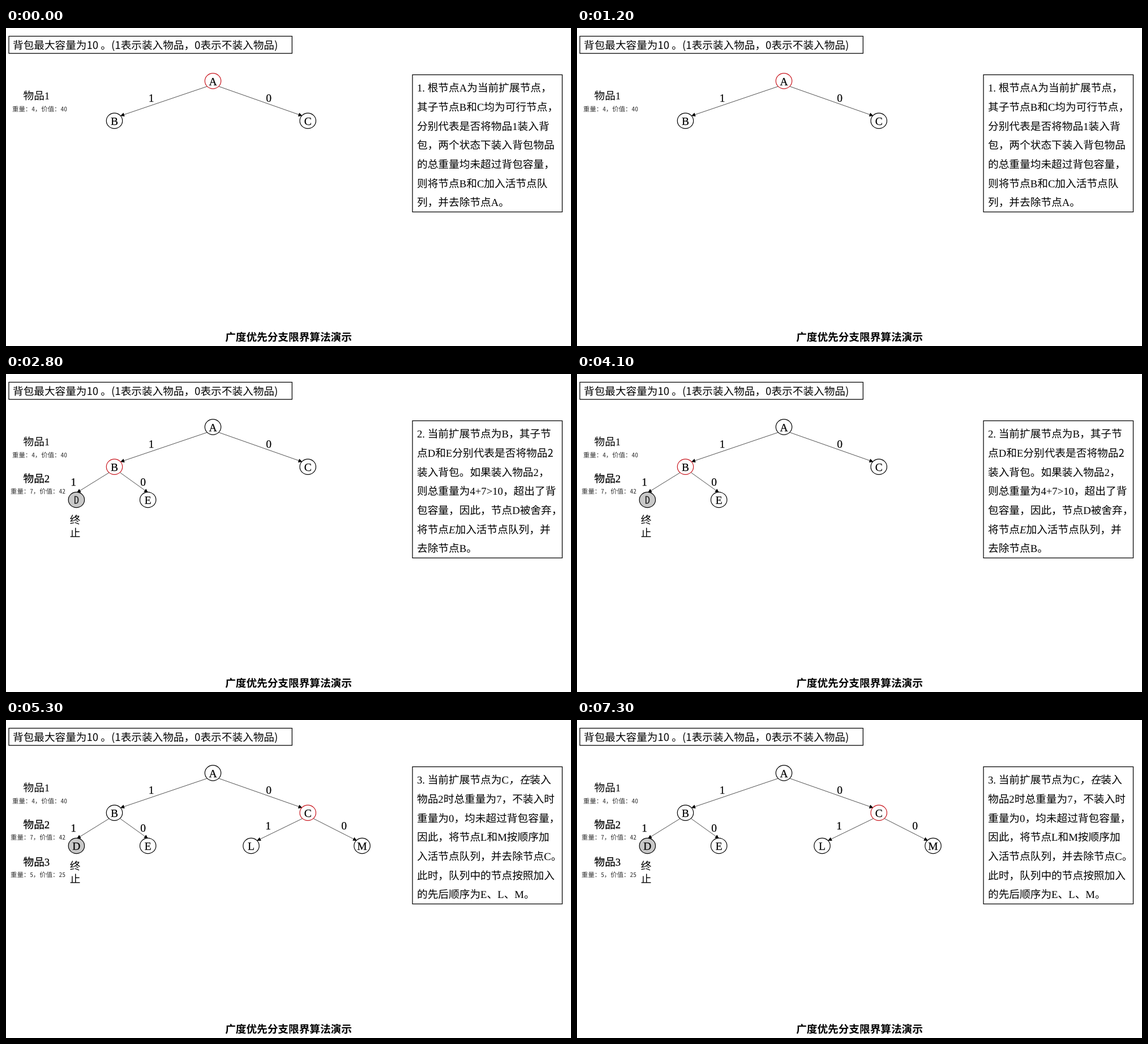
Animation of 998x561 px, one loop 8000 ms. Source, as an HTML page:

```html
<!DOCTYPE html>
<html lang="zh-CN">
<head>
<meta charset="utf-8">
<title>广度优先分支限界算法演示</title>
<style>
html, body { margin: 0; width: 100%; height: 100%; overflow: hidden; background: #fff; }
svg { display: block; width: 100%; height: 100%; text-rendering: geometricPrecision; }
text { font: 300 18.7px "Liberation Serif", "Noto Sans CJK SC", "Noto Sans CJK", serif; fill: #000; }
.sans { font-family: "Noto Sans CJK SC", "Noto Sans CJK", sans-serif; font-size: 18.65px; }
.title { font-weight: bold; }
.small { font-family: "Noto Sans Mono CJK SC", "Noto Sans CJK SC", monospace; font-size: 11.4px; fill: #333; }
.mono { font-family: "Noto Sans Mono CJK SC", "Liberation Mono", monospace; fill: #222; }
.mid { text-anchor: middle; }
.node { font-size: 19.5px; }
.heavy, .node { stroke: #000; stroke-width: .25px; }
.i { font-style: italic; }
rect { fill: none; stroke: #000; stroke-width: 1.25px; }
line { stroke: #222; stroke-width: .8px; }
ellipse { stroke-width: 1.2px; }
</style>
</head>
<body>
<svg id="stage" viewBox="0 0 998 561"></svg>
<script>
const LOOP = 8000;
const STEPS = [0, 2800, 5300];

// name, x, y, first step in which the node shows
const NODES = [
  ['A', 365.5, 93.5, 0], ['B', 191.5, 163.7, 0], ['C', 533.2, 163.7, 0],
  ['D', 124.4, 222, 1], ['E', 250.7, 222, 1],
  ['L', 433, 222, 2], ['M', 629, 222, 2]
];

// x1, y1, x2, y2, label, label x, label centre y, first step
const EDGES = [
  [355.5, 103, 202, 155, 1, 256.5, 124, 0],
  [375.7, 103, 523.5, 155, 0, 464, 124, 0],
  [182, 174, 125, 209.3, 1, 119, 190.5, 1],
  [201.7, 174, 251, 209.3, 0, 242, 190.5, 1],
  [523.3, 174, 443, 213, 1, 463, 187, 2],
  [543.3, 174, 620, 213, 0, 597, 187, 2]
];

// name, weight, value, note x, centre y
const ITEMS = [
  ['物品1', 4, 40, 11, 119],
  ['物品2', 7, 42, 8, 184],
  ['物品3', 5, 25, 8, 250]
];

const NOTES = [
  ['1. 根节点A为当前扩展节点，', '其子节点B和C均为可行节点，', '分别代表是否将物品1装入背',
   '包，两个状态下装入背包物品', '的总重量均未超过背包容量，', '则将节点B和C加入活节点队', '列，并去除节点A。'],
  ['2. 当前扩展节点为B，其子节', '点D和E分别代表是否将物品<tspan class="sans">2</tspan>', '装入背包。如果装入物品2，',
   '则总重量为4+7&gt;10，超出了背', '包容量，因此，节点D被舍弃，',
   '将节点<tspan class="i">E</tspan>加入活节点队列，并', '去除节点B。'],
  ['3. 当前扩展节点为C<tspan class="i">，在</tspan>装入', '物品2时总重量为7，不装入时', '重量为0，均未超过背包容量，',
   '因此，将节点L和M按顺序加', '入活节点队列，并去除节点C。', '此时，队列中的节点按照加入', '的先后顺序为E、L、M。']
];

const text = (x, y, s, cls = '') => `<text x="${x}" y="${y}" class="${cls}">${s}</text>`;
const box = (x, y, w, h) => `<rect x="${x}" y="${y}" width="${w}" height="${h}"/>`;

function edge([x1, y1, x2, y2, label, lx, ly]) {
  const deg = Math.atan2(y2 - y1, x2 - x1) * 180 / Math.PI;
  return `<line x1="${x1}" y1="${y1}" x2="${x2}" y2="${y2}"/>` +
    `<path d="M0 0L-7-3.4V3.4Z" transform="translate(${x2} ${y2}) rotate(${deg})"/>` +
    text(lx, ly + 6.3, label, 'mid node');
}

function node([name, x, y], step) {
  const stroke = name === 'ABC'[step] ? '#c8161e' : '#000';
  const fill = name === 'D' ? '#c8c8c8' : '#fff';
  const cls = name === 'D' && step === 1 ? 'mid mono' : 'mid node';
  return `<ellipse cx="${x}" cy="${y}" rx="14.2" ry="13.6" fill="${fill}" stroke="${stroke}"/>` +
    text(x, y + 7.2, name, cls);
}

function item([name, weight, value, x, y], i) {
  return text(30.5, y + 7, name, i ? 'heavy' : '') +
    text(x, y + (i ? 27.2 : 28.2), `重量：${weight}，价值：${value}`, 'small');
}

function scene(step) {
  const shown = row => row[row.length - 1] <= step;
  return box(5, 14.5, 500.3, 30.2) +
    text(12, 36.8, '背包最大容量为10 。(1表示装入物品，0表示不装入物品)', 'sans') +
    box(718, 82.5, 264.5, 242) +
    NOTES[step].map((s, i) => text(726, 112.3 + i * 33.67, s)).join('') +
    ITEMS.slice(0, step + 1).map(item).join('') +
    EDGES.filter(shown).map(edge).join('') +
    NODES.filter(shown).map(n => node(n, step)).join('') +
    (step ? text(122, 264, '终', 'mid') + text(122, 287, '止', 'mid') : '') +
    text(499, 552, '广度优先分支限界算法演示', 'sans title mid');
}

const stage = document.getElementById('stage');
const start = performance.now();
let current = -1;

function render(now) {
  const t = Math.max(0, now - start) % LOOP;
  const step = STEPS.filter(s => s <= t).length - 1;
  if (step !== current) stage.innerHTML = scene(current = step);
  requestAnimationFrame(render);
}
render(start);
</script>
</body>
</html>
```
